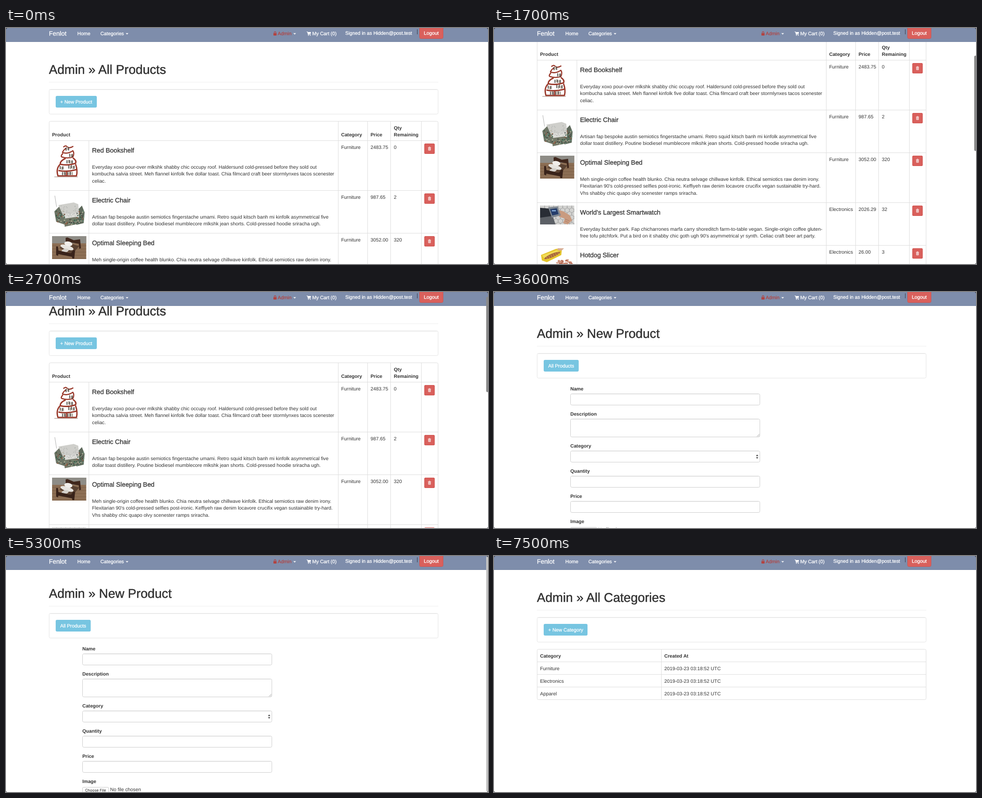
An HTML page with a canvas for the animation above (8000 ms loop, 1067 by 525 pixels).

```html
<!DOCTYPE html>
<html lang="en">
<head>
<meta charset="utf-8">
<title>Shop admin</title>
<style>
html, body { margin: 0; width: 100%; height: 100%; overflow: hidden; background: #fff; }
canvas { display: block; }
</style>
</head>
<body>
<canvas id="stage" width="1067" height="525"></canvas>
<script>
(() => {
const W = 1067, H = 525, LOOP = 8000, STEP = 100;
const ctx = document.getElementById('stage').getContext('2d');
const SANS = '"Liberation Sans", Arial, sans-serif';
const BODY = 10.75, INK = '#333', LINE = '#ddd', INFO = '#77c5e1', INFO_HOVER = '#50adcf', RED = '#d9605c';

const PRODUCTS = [
  { y: 250, name: 'Red Bookshelf', cat: 'Furniture', price: '2483.75', qty: '0', art: shelf, lines: [
    'Everyday xoxo pour-over mlkshk shabby chic occupy roof. Haldersund cold-pressed before they sold out',
    'kombucha salvia street. Meh flannel kinfolk five dollar toast. Chia filmcard craft beer stormlynxes tacos scenester',
    'celiac.'] },
  { y: 361, name: 'Electric Chair', cat: 'Furniture', price: '987.65', qty: '2', art: chair, lines: [
    'Artisan fap bespoke austin semiotics fingerstache umami. Retro squid kitsch banh mi kinfolk asymmetrical five',
    'dollar toast distillery. Poutine biodiesel mumblecore mlkshk jean shorts. Cold-pressed hoodie sriracha ugh.'] },
  { y: 456, name: 'Optimal Sleeping Bed', cat: 'Furniture', price: '3052.00', qty: '320', art: bed, lines: [
    'Meh single-origin coffee health blunko. Chia neutra selvage chillwave kinfolk. Ethical semiotics raw denim irony.',
    "Flexitarian 90's cold-pressed selfies post-ironic. Keffiyeh raw denim locavore crucifix vegan sustainable try-hard.",
    'Vhs shabby chic quapo olvy scenester ramps sriracha.'] },
  { y: 567, name: "World's Largest Smartwatch", cat: 'Electronics', price: '2026.29', qty: '32', art: watch, lines: [
    'Everyday butcher park. Fap chicharrones marfa carry shoreditch farm-to-table vegan. Single-origin coffee gluten-',
    "free tofu pitchfork. Put a bird on it shabby chic goth ugh 90's asymmetrical yr synth. Celiac craft beer art party."] },
  { y: 662, name: 'Hotdog Slicer', cat: 'Electronics', price: '26.00', qty: '3', art: slicer, lines: [
    "Selfies locavore photo booth try-hard roof cray tacos diy. Mild brooklyn fashion axe 90's. Crucifix olvy cliche"] }
];

function rect(x, y, w, h, color) {
  ctx.fillStyle = color;
  ctx.fillRect(x, y, w, h);
}
function box(x, y, w, h, r, fill, stroke) {
  ctx.beginPath();
  ctx.roundRect(x, y, w, h, r);
  if (fill) { ctx.fillStyle = fill; ctx.fill(); }
  if (stroke) { ctx.strokeStyle = stroke; ctx.lineWidth = 1; ctx.stroke(); }
}
function poly(color, ...p) {
  ctx.beginPath();
  for (let i = 0; i < p.length; i += 2) ctx.lineTo(p[i], p[i + 1]);
  ctx.closePath();
  ctx.fillStyle = color;
  ctx.fill();
}
function oval(x, y, rx, ry, color, turn = 0) {
  ctx.beginPath();
  ctx.ellipse(x, y, rx, ry, turn, 0, Math.PI * 2);
  ctx.fillStyle = color;
  ctx.fill();
}
function curve(color, width, d) {
  ctx.strokeStyle = color;
  ctx.lineWidth = width;
  ctx.stroke(new Path2D(d));
}
// y is the middle of the capitals; thick adds a thin outline for medium weight
function text(s, x, y, color = INK, size = BODY, weight = '', thick = 0) {
  ctx.font = `${weight} ${size}px ${SANS}`;
  ctx.fillStyle = color;
  const base = y + size * 0.36;
  ctx.fillText(s, x, base);
  if (thick) {
    ctx.strokeStyle = color;
    ctx.lineWidth = thick;
    ctx.strokeText(s, x, base);
  }
}
const bold = (s, x, y) => text(s, x, y, INK, 10.65, 'bold');
const light = (s, x, y, size = BODY) => text(s, x, y, '#fff', size, '', 0.3);
const ramp = (t, a, b) => {
  const x = Math.min(1, Math.max(0, (t - a) / (b - a)));
  return x * x * (3 - 2 * x);
};
function random(seed) {
  return () => (seed = (seed * 16807) % 2147483647) / 2147483647;
}

// Product pictures, drawn from their own top left corner
function shelf() {
  const red = '#9a3a2c';
  rect(5, 73.5, 52, 1.5, '#b9aaa2');
  curve(red, 2.6, 'M25 8Q30 3 33 7Q38 12 47 6M33 9Q25 14 23 20Q35 24 46 16Q50 22 46 30Q34 34 22 30Q18 28 24 22');
  curve(red, 3, 'M30 33Q18 38 18 46Q34 50 52 44Q55 38 46 32M18 46Q8 56 13 72H54Q57 60 52 46M14 60Q32 64 54 58M32 61V72');
  const rnd = random(5);
  for (const [x, y, n] of [[30, 9, 4], [38, 24, 4], [32, 38, 7], [36, 50, 7], [17, 52, 5], [34, 64, 6], [22, 64, 4]])
    for (let i = 0; i < n; i++)
      rect(x + i * 2, y - rnd() * 2, 1.6, 7, ['#3c3a38', '#d8d3c8', '#8c7f70'][i % 3]);
}
function chair() {
  curve('#999', 0.8, 'M6 5L10 30');
  poly('#6d7566', 5, 40, 16, 29, 30, 40, 30, 70, 9, 63);
  poly('#5f6a5c', 52, 42, 66, 27, 72, 42, 70, 66, 54, 70);
  poly('#cfcfcb', 14, 26, 48, 20, 58, 24, 60, 46, 24, 48);
  poly('#dcdcd8', 26, 46, 58, 43, 60, 53, 29, 57);
  poly('#747868', 26, 56, 56, 52, 57, 68, 28, 74);
  const rnd = random(11), hues = ['#375f4a', '#8c5942', '#b7b39c', '#39413d', '#6f927d'];
  for (let i = 0; i < 90; i++) {
    const side = i % 3, u = rnd(), v = rnd();
    const x = side === 0 ? 8 + u * 19 : side === 1 ? 54 + u * 15 : 28 + u * 27;
    const y = side === 0 ? 38 + v * 25 : side === 1 ? 38 + v * 27 : 56 + v * 13;
    rect(x, y, 2.6, 2.2, hues[i % 5]);
  }
  for (let i = 0; i < 36; i++) rect(19 + rnd() * 37, 27 + rnd() * 23, 1.7, 1.2, '#a5a8a5');
}
function bed() {
  rect(0, 0, 75.6, 51, '#8c6e54');
  rect(0, 0, 75.6, 16, '#8e8c86');
  for (let i = 0; i < 5; i++) rect(0, 21 + i * 7, 75.6, 0.7, '#745840');
  poly('#40271c', 30, 4, 34, 3, 48, 9, 62, 7, 64, 27, 60, 28, 59, 17, 34, 13, 33, 21, 30, 20);
  poly('#5a4232', 16, 26, 34, 15, 60, 22, 45, 40);
  oval(33, 25, 15, 5, '#e7e4df', 0.3);
  oval(36, 17, 9, 5, '#f1eeea', 0.2);
  oval(29, 32, 8, 4, '#d5d1cb', -0.2);
  poly('#39231a', 9, 23, 13, 23, 14, 32, 42, 38, 47, 31, 51, 32, 49, 50, 45, 50, 44, 46, 14, 40, 13, 44, 9, 42);
}
function watch() {
  rect(0, 0, 75.6, 42, '#d2d2d0');
  ctx.save();
  ctx.beginPath();
  ctx.rect(0, 0, 75.6, 42);
  ctx.clip();
  for (let r = 0; r < 6; r++)
    for (let c = 0; c < 9; c++) {
      const x = c * 10 + (r % 2) * 5, y = r * 8;
      curve('#a0a0a0', 0.7, `M${x} ${y}l5 -3l5 3v5l-5 3l-5 -3z`);
    }
  poly('#292d35', 0, 5, 23, 7, 29, 24, 0, 28);
  poly('#5c6066', 0, 27, 28, 23, 34, 42, 0, 42);
  poly('#c99b80', 38, 9, 52, 13, 66, 22, 71, 33, 61, 42, 51, 39, 55, 29, 42, 25);
  curve('#a8765f', 1, 'M55 30L65 34M55 34L63 38');
  poly('#7f8790', 18, 4, 39, 2, 46, 22, 26, 27);
  poly('#253d6b', 22, 8, 37, 6, 41, 19, 27, 22);
  rect(26, 10, 9, 3, '#7ba0cc');
  ctx.restore();
}
function slicer() {
  poly('#e5c52c', 2, 15, 36, 1, 48, 5, 47, 15, 15, 31, 4, 27);
  poly('#f2dc57', 4, 16, 37, 4, 44, 8, 10, 23);
  oval(27, 16, 19, 4, '#a9673f', -0.4);
  for (let i = 0; i < 6; i++) curve('#e6c94a', 0.8, `M${14 + i * 5} ${19 - i * 2}l3 6`);
  poly('#d8ae93', 38, 0, 53, 0, 48, 5, 40, 5);
  const rnd = random(23);
  for (let i = 0; i < 48; i++) {
    const a = rnd() * 6.28, r = Math.sqrt(rnd());
    oval(54 + Math.cos(a) * r * 18, 33 + Math.sin(a) * r * 8, 2.4, 1.6, i % 2 ? '#d79b83' : '#b9725e');
  }
}

function caret(x, y, color) {
  poly(color, x, y, x + 6, y, x + 3, y + 3);
}
function navbar(t) {
  rect(0, -30, W, 61, '#7e8dab');
  rect(0, 30, W, 1, '#7584a2');
  const opened = t >= 6400 && t < 7500;
  if (opened) rect(581, -30, 73, 60.5, '#e7e7e7');
  light('Fenlot', 95, 12, 14);
  light('Home', 158, 12.5);
  light('Categories', 209, 12.5);
  caret(265, 11.5, '#fff');

  const red = '#b3423f';
  curve(red, 1.2, 'M593.7 12V10a1.9 1.9 0 0 1 3.8 0V12');
  box(592, 11.5, 7, 5.2, 0.8, red);
  text('Admin', 601.5, 12.5, red, BODY, '', 0.2);
  caret(636, 11.5, t >= 6000 && t < 7500 ? '#333' : '#fff');

  curve('#fff', 1.1, 'M665.5 8.5H667.5L669 14.5H674.5');
  poly('#fff', 667.5, 9, 675, 9, 674.4, 13, 668.5, 13.5);
  oval(669.5, 16.3, 1, 1, '#fff');
  oval(673.7, 16.3, 1, 1, '#fff');
  light('My Cart (0)', 678, 12.5);
  light('Signed in as Hidden@post.test', 751, 11);
  rect(910, 3, 1, 11, '#333b4c');
  box(915.5, -8, 52, 31.5, 3, RED, '#cf524e');
  light('Logout', 925, 11);
}
function dropdown(t) {
  ctx.save();
  ctx.shadowColor = 'rgba(0,0,0,.18)';
  ctx.shadowBlur = 9;
  ctx.shadowOffsetY = 4;
  box(532.5, 30.5, 121, 68, [0, 0, 3, 3], '#fff');
  ctx.restore();
  box(532.5, 30.5, 121, 68, [0, 0, 3, 3], null, '#ccc');
  const active = t < 6700 ? -1 : Math.min(2, Math.floor((t - 6700) / 100));
  ['Dashboard', 'Products', 'Categories'].forEach((s, i) => {
    const y = 35.5 + i * 19.7;
    if (i === active) rect(533, y, 120, 19.7, '#f5f5f5');
    text(s, 548, y + 9.8, i === active ? '#262626' : INK);
  });
}

function pageTop(title, label, width, hover) {
  text(title, 95, 92, INK, 28.1, '', 0.55);
  rect(95, 120, 862, 1, '#eee');
  box(95.5, 136.5, 861, 55, 3, '#fff', '#e3e3e3');
  rect(97, 137, 858, 1, '#efefef');
  box(110, 151, width, 26, 3, hover ? INFO_HOVER : INFO);
  light(label, 120, 164.5);
}
function trash(y) {
  box(926, y + 7, 23, 23, 2.5, RED);
  box(926.5, y + 7.5, 22, 22, 2.5, null, '#d0504c');
  rect(934, y + 15.5, 7, 1, '#fff');
  rect(936, y + 14.3, 3, 1, '#fff');
  box(934.7, y + 17, 5.6, 5.5, 0.8, '#f8e4e3');
  for (let i = 0; i < 2; i++) rect(936.2 + i * 1.8, y + 18, 0.7, 3.5, RED);
}
function productsPage(t) {
  pageTop('Admin » All Products', '+ New Product', 91, t >= 3100);
  box(95.5, 207.5, 861, 700, 3, null, LINE);
  bold('Product', 102, 237);
  bold('Category', 742, 237);
  bold('Price', 807, 237);
  bold('Qty', 858.5, 222);
  bold('Remaining', 858.5, 237);
  for (const x of [735, 800, 851, 919]) rect(x, 208, 1, 600, LINE);
  rect(183, 250, 1, 558, LINE);
  for (const p of PRODUCTS) {
    rect(95, p.y, 862, 1, LINE);
    ctx.save();
    ctx.translate(102, p.y + 7);
    p.art();
    ctx.restore();
    text(p.name, 190.5, p.y + 22, INK, 14.3, '', 0.35);
    p.lines.forEach((s, i) => text(s, 190.5, p.y + 59.5 + i * 15.1));
    text(p.cat, 742, p.y + 15);
    text(p.price, 807, p.y + 15);
    text(p.qty, 858.5, p.y + 15);
    trash(p.y);
  }
}
function formPage(t) {
  pageTop('Admin » New Product', 'All Products', 77.5, t < 3600);
  const fields = [['Name', 215, 25], ['Description', 271, 40], ['Category', 342, 25], ['Quantity', 398, 25], ['Price', 454, 25]];
  for (const [label, y, h] of fields) {
    bold(label, 169, y);
    box(169.5, y + 11.5, 419, h, 3, '#fff', '#ccc');
    rect(171, y + 12, 416, 1, '#f3f3f3');
  }
  curve('#888', 0.8, 'M582 321.5L587.5 316M585 321.5L587.5 319');
  poly('#444', 580, 365, 585, 365, 582.5, 361.5);
  poly('#444', 580, 367.5, 585, 367.5, 582.5, 371);
  bold('Image', 169, 510);
  box(169.5, 523.5, 58, 12.5, 2.5, '#fff', '#c8c8c8');
  ctx.font = '8.3px Inter, sans-serif';
  ctx.fillStyle = '#222';
  ctx.fillText('Choose File', 175, 533);
  text('No file chosen', 230.5, 528);
}
function categoriesPage() {
  pageTop('Admin » All Categories', '+ New Category', 97);
  box(95.5, 207.5, 861, 112, 3, null, LINE);
  rect(370, 208, 1, 111, LINE);
  bold('Category', 102, 222);
  bold('Created At', 377, 222);
  ['Furniture', 'Electronics', 'Apparel'].forEach((s, i) => {
    const y = 235 + i * 28;
    rect(95, y, 862, 1, LINE);
    text(s, 102, y + 15);
    text('2019-03-23 03:18:52 UTC', 377, y + 15);
  });
}

function listScroll(t) {
  const x = Math.min(t / 1000, 3);
  return Math.round(x * (3 - x) * (112.29 - 18.5 * x));
}
function draw(t) {
  rect(0, 0, W, H, '#fff');
  const list = t < 3300, form = !list && t < 7500;
  const scroll = list ? listScroll(t) : form ? 22 * (ramp(t, 3900, 4700) - ramp(t, 4800, 5700)) : 0;
  ctx.save();
  ctx.translate(0, -Math.round(scroll));
  if (list) productsPage(t);
  else if (form) formPage(t);
  else categoriesPage();
  ctx.restore();

  // the bar itself only moves once the page is past its end
  ctx.save();
  if (form) ctx.translate(0, -Math.max(0, Math.round(scroll - 11.4)));
  navbar(t);
  ctx.restore();
  if (t >= 6400 && t < 7500) dropdown(t);

  if (list && t > 0) box(1063, scroll * 0.394 - 9, 6, 212, 3, '#8b8b8b');
  if (t >= 5000 && t < 5800) box(1063, 1, 6, 523, 3, '#c4c4c4');

  for (const [x, y, dx, dy] of [[0, 0, 3, 3], [W, 0, -3, 3], [0, H, 2, -2], [W, H, -2, -2]])
    poly('#4a4f5a', x, y, x + dx, y, x, y + dy);
}

ctx.textRendering = 'geometricPrecision';
ctx.lineJoin = 'round';
function frame() {
  draw(Math.floor((performance.now() % LOOP) / STEP) * STEP);
  requestAnimationFrame(frame);
}
frame();
})();
</script>
</body>
</html>
```
